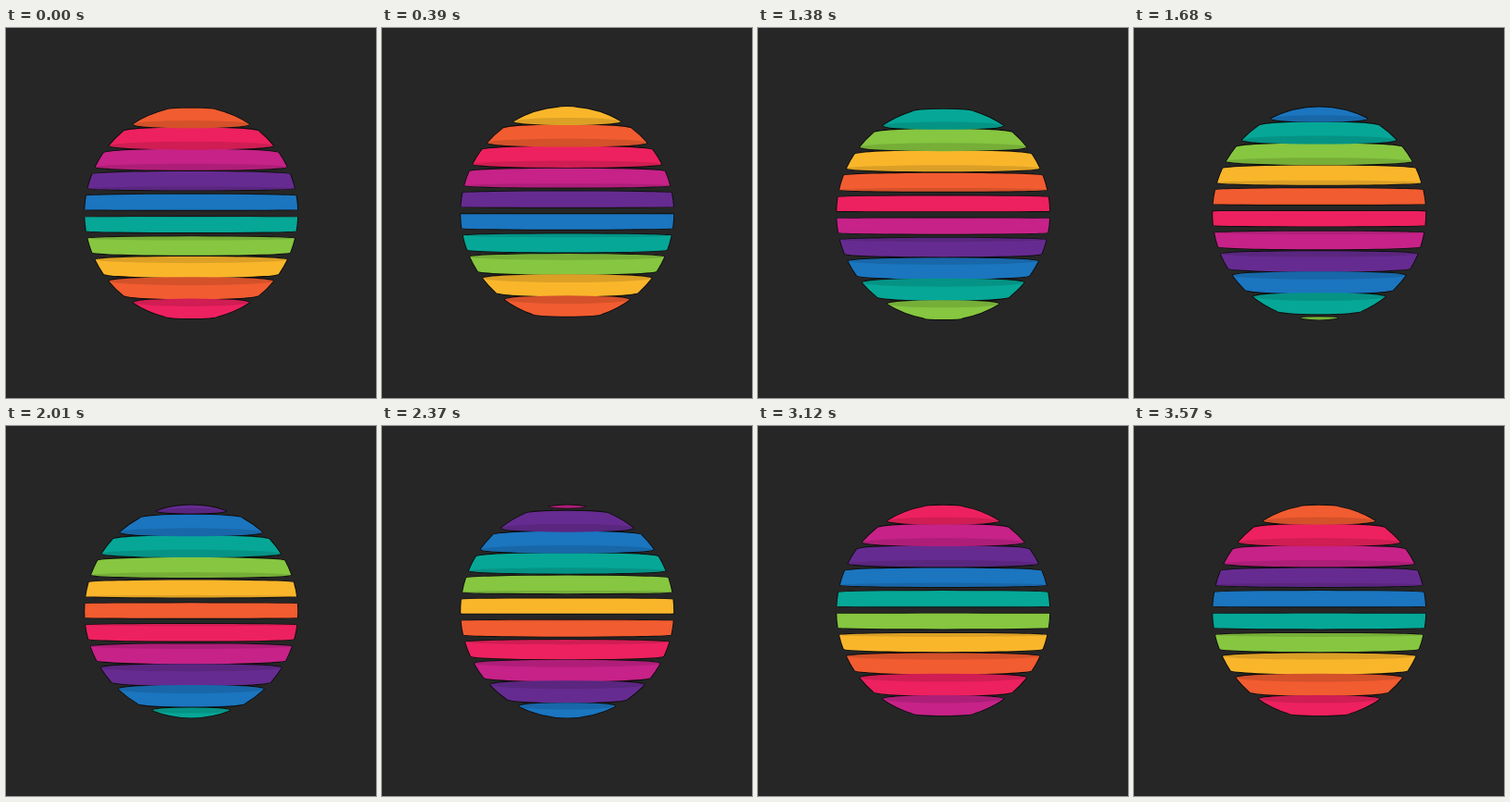
These frames come from a looping animation (400 px wide and 400 px high, 3.6 s). An HTML page with a canvas:

```html
<!DOCTYPE html>
<html lang="en">
<head>
<meta charset="utf-8">
<title>Sliced sphere</title>
<style>
  html, body { margin: 0; width: 100%; height: 100%; overflow: hidden; background: #262626; }
  canvas { display: block; width: 400px; height: 400px; }
</style>
</head>
<body>
<canvas id="stage" width="400" height="400"></canvas>
<script>
const ctx = document.getElementById('stage').getContext('2d');
const CX = 200.2, CY = 200.4, RADIUS = 115, EYE = 1450;
const PITCH = 23.1, GAP = 7.9;
const LOOP = 3600, STEP = 30;
const BACKGROUND = '#262626', OUTLINE = '#0d0d0d', SHADE = 'rgba(0,0,0,0.12)';
const COLORS = ['#1b75bf', '#662b90', '#c62288', '#ed215f',
                '#f15c30', '#fab62b', '#86c640', '#06a797'];

const clamp = h => Math.max(-RADIUS, Math.min(RADIUS, h));
const limbAngle = h => Math.asin(h / RADIUS);

// Horizontal cut through the sphere at height h, seen in slight perspective.
function addCut(path, h, from, to) {
  const r = Math.sqrt(RADIUS * RADIUS - h * h);
  path.ellipse(CX, CY - h, r, Math.abs(h) * r / EYE, 0, from, to);
}

function makeSlab(bottom, top, color) {
  const outline = new Path2D();
  addCut(outline, top, Math.PI, 2 * Math.PI);
  outline.arc(CX, CY, RADIUS, -limbAngle(top), -limbAngle(bottom));
  addCut(outline, bottom, 0, Math.PI);
  outline.arc(CX, CY, RADIUS, Math.PI + limbAngle(bottom), Math.PI + limbAngle(top));
  outline.closePath();

  // The flat side facing the equator is the one in view.
  const face = new Path2D();
  if (bottom > 0) addCut(face, bottom, 0, 2 * Math.PI);
  else if (top < 0) addCut(face, top, 0, 2 * Math.PI);

  return { outline, face, color, distance: Math.abs(bottom + top) };
}

function draw(time) {
  const shift = time / LOOP * COLORS.length;
  const slabs = [];
  for (let n = Math.floor(shift) - 6; n <= shift + 6; n++) {
    const base = (n - shift) * PITCH + GAP / 2;
    const bottom = clamp(base), top = clamp(base + PITCH - GAP);
    if (top - bottom > 0.1) {
      slabs.push(makeSlab(bottom, top, COLORS[(n + COLORS.length) % COLORS.length]));
    }
  }
  // Outer slabs overlap those nearer the equator.
  slabs.sort((a, b) => a.distance - b.distance);

  ctx.fillStyle = BACKGROUND;
  ctx.fillRect(0, 0, 400, 400);
  ctx.strokeStyle = OUTLINE;
  ctx.lineWidth = 1.8;
  ctx.lineJoin = 'round';
  for (const { outline } of slabs) ctx.stroke(outline);
  for (const { outline, face, color } of slabs) {
    ctx.fillStyle = color;
    ctx.fill(outline);
    ctx.fillStyle = SHADE;
    ctx.fill(face);
  }
}

let start;
function tick(now) {
  start ??= now;
  draw(Math.floor(((now - start) % LOOP) / STEP) * STEP);
  requestAnimationFrame(tick);
}
draw(0);
requestAnimationFrame(tick);
</script>
</body>
</html>
```
